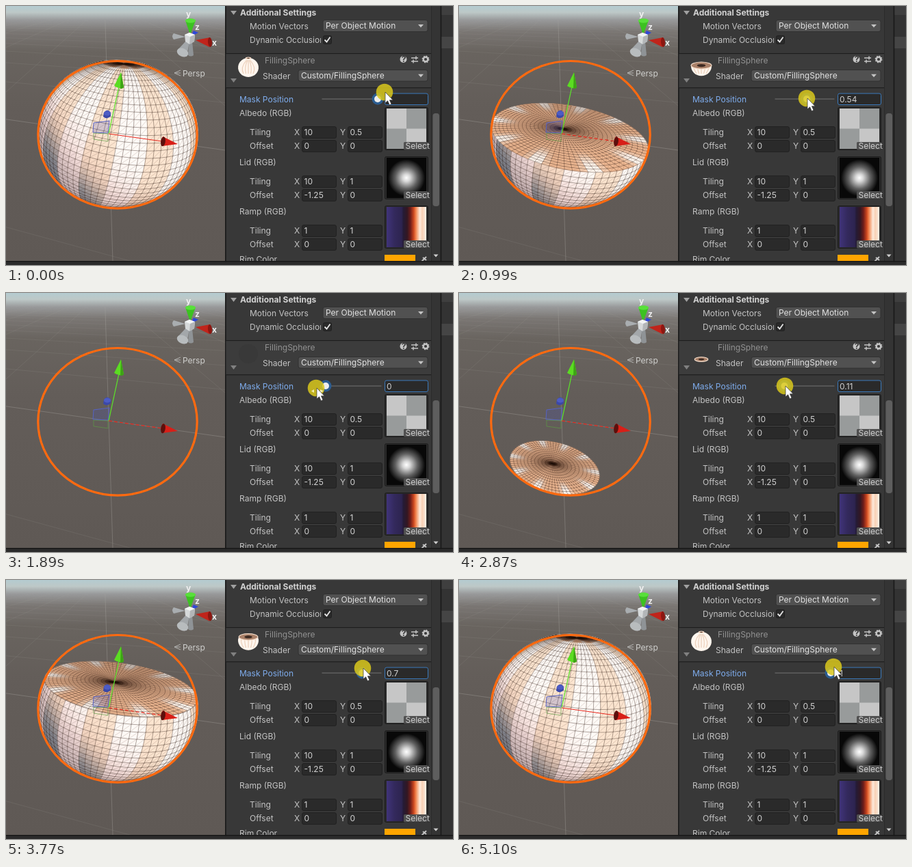
These frames come from a looping animation (653x379 px, 5.2 s). An HTML page with a canvas:

```html
<!DOCTYPE html>
<html lang="en">
<head>
<meta charset="utf-8">
<title>Filling sphere</title>
<style>
html, body { margin: 0; width: 653px; height: 379px; overflow: hidden; background: #282828; }
canvas, svg { position: absolute; left: 0; top: 0; display: block; }
text { font-family: Inter, "Liberation Sans", Arial, sans-serif; font-size: 12px; white-space: pre; }
</style>
</head>
<body>
<canvas id="scene" width="320" height="373"></canvas>
<svg id="ui" width="653" height="379" viewBox="0 0 653 379">
  <defs>
    <radialGradient id="glow">
      <stop offset="0" stop-color="#fff"/><stop offset=".2" stop-color="#d8d8d8"/>
      <stop offset=".6" stop-color="#606060"/><stop offset="1" stop-color="#080808"/>
    </radialGradient>
    <linearGradient id="ramp">
      <stop offset="0" stop-color="#40347a"/><stop offset=".2" stop-color="#33295c"/>
      <stop offset=".38" stop-color="#2d2450"/><stop offset=".42" stop-color="#251b36"/>
      <stop offset=".52" stop-color="#331722"/><stop offset=".6" stop-color="#6e1d1a"/>
      <stop offset=".68" stop-color="#c8451f"/><stop offset=".73" stop-color="#ef7b46"/>
      <stop offset=".78" stop-color="#f6b08a"/><stop offset=".84" stop-color="#fdeadb"/>
      <stop offset=".9" stop-color="#f8d0b4"/><stop offset="1" stop-color="#fdf2e8"/>
    </linearGradient>
    <clipPath id="occl"><rect x="350" y="40" width="110" height="20"/></clipPath>
    <clipPath id="panelClip"><rect width="653" height="373"/></clipPath>
  </defs>
</svg>
<script>
const LOOP = 5200;
// bursts of picture changes: start, spacing, count
const BURSTS = [
  [0, 120, 2], [430, 110, 5], [990, 120, 2], [1220, 105, 3], [1550, 110, 2], [1775, 115, 2],
  [2210, 110, 5], [2770, 100, 2], [2990, 120, 3], [3330, 0, 1], [3550, 110, 3], [3870, 120, 2],
  [4110, 100, 2], [4540, 110, 5], [5100, 0, 1]
];
const TIMES = BURSTS.flatMap(([start, gap, n]) => Array.from({ length: n }, (_, i) => start + i * gap));
// time, mask value, pointer x, pointer y
const DRAG = [
  [0, 1, 553, 126], [120, 1, 557, 127], [430, .99, 546, 131], [540, .93, 538, 133], [870, .62, 514, 135],
  [990, .54, 508, 135], [1430, .16, 479, 137], [1660, .03, 467, 138], [1775, 0, 459, 139], [1890, 0, 453, 139],
  [2320, 0, 463, 138], [2650, .05, 471, 137], [2870, .11, 476, 136], [3110, .33, 491, 132], [3330, .53, 506, 130],
  [3770, .7, 521, 129], [3990, .81, 530, 128], [4210, .9, 537, 128], [4540, .92, 538, 128], [4980, 1, 546, 128],
  [5100, 1, 547, 127]
];

const svg = document.getElementById('ui');
const ctx = document.getElementById('scene').getContext('2d');

function el(tag, attrs, parent = svg) {
  const node = document.createElementNS('http://www.w3.org/2000/svg', tag);
  for (const key in attrs) node.setAttribute(key, attrs[key]);
  return parent.appendChild(node);
}
const rect = (x, y, width, height, fill, more = {}, parent) => el('rect', { x, y, width, height, fill, ...more }, parent);
const path = (d, fill, more = {}, parent) => el('path', { d, fill, ...more }, parent);
const circle = (cx, cy, r, fill, more = {}, parent) => el('circle', { cx, cy, r, fill, ...more }, parent);
const oval = (cx, cy, rx, ry, fill, turn = 0) =>
  el('ellipse', { cx, cy, rx, ry, fill, transform: `rotate(${turn} ${cx} ${cy})` });
function label(x, mid, str, fill = '#c4c4c4', more = {}, parent) {
  const node = el('text', { x, y: mid + 4.3, fill, ...more }, parent);
  node.textContent = str;
  return node;
}

/* ---- camera and sphere ---- */
const FOCAL = 357, EYE = [8, 187], CENTER = [1.372, 0, 3.447];
const PITCH = 28 * Math.PI / 180, YAW = 18.6 * Math.PI / 180;
const sp = Math.sin(PITCH), cp = Math.cos(PITCH), sy = Math.sin(YAW), cy = Math.cos(YAW);
const AX = [cy, sy * sp, -sy * cp], AZ = [sy, -cy * sp, cy * cp], UP = [0, -cp, -sp];
const dirOf = (a, h, b) => AX.map((x, i) => a * x + h * UP[i] + b * AZ[i]);
const toCamera = d => d.map((v, i) => v + CENTER[i]);
const project = p => [EYE[0] + FOCAL * p[0] / p[2], EYE[1] + FOCAL * p[1] / p[2]];
const place = (a, h, b) => project(toCamera(dirOf(a, h, b)));

const clamp = x => Math.min(1, Math.max(0, x));
const smooth = (a, b, x) => { const t = clamp((x - a) / (b - a)); return t * t * (3 - 2 * t); };
const mix = (a, b, t) => a.map((v, i) => v + (b[i] - v) * t);
const rgb = c => `rgb(${c.map(Math.round)})`;
const dot = (a, b) => a[0] * b[0] + a[1] * b[1] + a[2] * b[2];

const SEGS = 80, ROWS = 40, TURN = 2 * Math.PI, LIGHT = [.54, -.6, -.59];
const cutOf = v => 1.94 * v - .97;

function bodyColor(n, lon) {
  const even = Math.floor(lon / (Math.PI / 10)) % 2 === 0;
  const d = dot(n, LIGHT);
  const lit = even ? [252, 229, 208] : [255, 250, 246];
  const soft = even ? [240, 205, 184] : [246, 221, 216];
  const c = mix(soft, lit, smooth(-.25, .35, d));
  const dark = smooth(.05, -.5, d) * clamp(.25 - n[0] * 1.3);
  return rgb(mix(c, even ? [112, 118, 130] : [196, 176, 178], dark * .9));
}

function trace(pts) {
  ctx.moveTo(...pts[0]);
  for (let i = 1; i < pts.length; i++) ctx.lineTo(...pts[i]);
}

function fillQuad(q, color) {
  ctx.beginPath();
  trace(q);
  ctx.closePath();
  ctx.fillStyle = ctx.strokeStyle = color;
  ctx.lineWidth = .7;
  ctx.fill();
  ctx.stroke();
}

function strokeWires(quads, alpha) {
  const pass = (a, draw) => {
    ctx.beginPath();
    quads.forEach(draw);
    ctx.lineWidth = .65;
    ctx.strokeStyle = `rgba(35,18,10,${a})`;
    ctx.stroke();
  };
  pass(alpha, q => trace([q[3], q[0], q[1]]));
  pass(alpha * .4, q => trace([q[0], q[2]]));
}

function drawBody(cut) {
  const quads = [], top = Math.asin(cut);
  const at = (lat, lon) => [Math.cos(lat) * Math.cos(lon), Math.sin(lat), Math.cos(lat) * Math.sin(lon)];
  for (let j = 0; j < ROWS; j++) {
    const lo = -Math.PI / 2 + j * Math.PI / ROWS;
    if (lo >= top) break;
    const hi = Math.min(top, lo + Math.PI / ROWS);
    for (let i = 0; i < SEGS; i++) {
      const l0 = i / SEGS * TURN, l1 = (i + 1) / SEGS * TURN, mid = (l0 + l1) / 2;
      const n = dirOf(...at((lo + hi) / 2, mid));
      if (dot(n, toCamera(n)) > 0) continue;
      const q = [[lo, l0], [lo, l1], [hi, l1], [hi, l0]].map(p => place(...at(...p)));
      fillQuad(q, bodyColor(n, mid));
      quads.push(q);
    }
  }
  strokeWires(quads, .55);
}

function drawLid(cut) {
  const radius = Math.sqrt(1 - cut * cut), rings = Math.max(4, Math.round(18 * radius)), quads = [];
  const at = (r, a) => place(r * radius * Math.cos(a), cut, r * radius * Math.sin(a));
  for (let j = 0; j < rings; j++) {
    for (let i = 0; i < SEGS; i++) {
      const r0 = j / rings, r1 = (j + 1) / rings, a0 = i / SEGS * TURN, a1 = (i + 1) / SEGS * TURN;
      const white = smooth(.6, .95, r1) * smooth(.1, .9, Math.cos(5 * (a0 + a1)));
      const q = [at(r1, a0), at(r1, a1), at(r0, a1), at(r0, a0)];
      fillQuad(q, rgb(mix([238, 184, 146], [255, 246, 238], white)));
      quads.push(q);
    }
  }
  strokeWires(quads, .5);
}

function drawGround() {
  const g = ctx.createLinearGradient(0, 0, 0, 373);
  [[0, '#b4cbd0'], [.025, '#bdc8c7'], [.055, '#98999a'], [.1, '#7a7673'], [.18, '#69645f'], [.4, '#635d59'], [1, '#5f5955']]
    .forEach(s => g.addColorStop(...s));
  ctx.fillStyle = g;
  ctx.fillRect(0, 0, 320, 373);
  const line = (p, q, alpha) => {
    let a = toCamera(dirOf(...p)), b = toCamera(dirOf(...q));
    if (a[2] < .2 && b[2] < .2) return;
    if (b[2] < a[2]) [a, b] = [b, a];
    if (a[2] < .2) a = mix(a, b, (.2 - a[2]) / (b[2] - a[2]));
    ctx.beginPath();
    trace([project(a), project(b)]);
    ctx.strokeStyle = `rgba(165,162,158,${alpha})`;
    ctx.lineWidth = 1;
    ctx.stroke();
  };
  for (let i = -14; i <= 14; i++) {
    const alpha = i === 0 ? .38 : .16 * (1 - Math.abs(i) / 18);
    line([i * 2, 0, -8], [i * 2, 0, 30], alpha);
    line([-30, 0, i * 2], [30, 0, i * 2], alpha);
  }
}

function drawScene(v) {
  drawGround();
  if (v > 0) {
    drawBody(cutOf(v));
    drawLid(cutOf(v));
  }
  ctx.beginPath();
  ctx.ellipse(163, 188.3, 116.2, 107.8, 0, 0, TURN);
  ctx.strokeStyle = '#ff6a10';
  ctx.lineWidth = 3.2;
  ctx.stroke();
}

/* ---- handles in the scene ---- */
function sceneHandles() {
  path('M128 171 L151 168 L149 186 L127 185 Z', 'rgba(70,80,190,.22)', { stroke: '#5663c4' });
  path('M128 186 L149 187 V198 L128 195 Z', 'none', { stroke: '#5d9a45', opacity: .7 });
  path('M150 187 L165 118', 'none', { stroke: '#5ce02c', 'stroke-width': 1.2 });
  const red = path('M150 187 L228 198', 'none', { stroke: '#e8281e', 'stroke-width': 1.2 });
  path('M168 97 L158 117 Q165 122 172 119 Z', '#5bdc22');
  path('M168 97 L167 121 Q171 121 172 119 Z', '#3da315');
  path('M251 202 L229 191 Q225 198 228 205 Z', '#d81f18');
  oval(229.5, 198.3, 3.3, 7, '#5c0f0c', 8);
  path('M143 156 Q148 149 153 156 V161 Q148 167 142 162 Z', '#3b48a8');
  oval(148, 157, 5, 3.6, '#4d5cc4');
  return red;
}

function axisGizmo() {
  path('M262 45 L245 40 Q241 44 245 49 Z', '#a9adb0');
  path('M264 50 L250 65 Q254 74 264 74 L268 52 Z', '#a3a7aa');
  oval(258, 68, 8.5, 6, '#b8bcbe', 22);
  path('M267 52 L266 72 Q270 75 274 72 L272 52 Z', '#8f9396');
  path('M270 45 L274 36 L281 39 Z', '#2f48d8');
  path('M269 42 L262 21 H277 Z', '#3cc221');
  oval(269.5, 21.5, 7.6, 3.2, '#58e03a');
  path('M261 42 L268 39 L276 42 L275 52 L268 56 L262 52 Z', '#d6d9da');
  path('M261 42 L268 39 L276 42 L269 45 Z', '#f2f4f4');
  path('M269 45 L276 42 L275 52 L268 56 Z', '#b3b6b8');
  path('M277 50 L298 46 Q302 53 297 60 Z', '#c0241b');
  oval(298, 53, 3, 7, '#8c1711', -5);
  const bold = { 'font-weight': 700, 'font-size': 13 };
  label(263, 12, 'y', '#f0f0f0', bold);
  label(276, 31, 'z', '#f0f0f0', bold);
  label(301, 54, 'x', '#f0f0f0', bold);
  path('M255 94 L246 98 L255 102 M246 98 H255', 'none', { stroke: '#b4b4b2' });
  label(258, 99, 'Persp', '#cfcfcd');
}

/* ---- inspector ---- */
const arrowDown = (x, y, fill, w = 4.5, h = 6) => path(`M${x - w} ${y} H${x + w} L${x} ${y + h} Z`, fill);
function dropdown(x, y, w, h, str) {
  rect(x, y, w, h, '#515151', { rx: 3, stroke: '#303030' });
  label(x + 4, y + h / 2 - .3, str, '#e2e2e2');
  arrowDown(x + w - 10, y + h / 2 - 2, '#c4c4c4', 4, 4.5);
}
function field(x, mid, name, str) {
  label(x - 11, mid, name);
  rect(x + .5, mid - 8.5, 50, 17, '#2a2a2a', { rx: 2.5, stroke: '#212121' });
  label(x + 3.5, mid, str, '#d2d2d2');
}
function textureRow(y, name, tiling, offset, paint) {
  label(341, y, name);
  [['Tiling', tiling, 28], ['Offset', offset, 48]].forEach(([title, pair, dy]) => {
    label(356, y + dy, title);
    field(432, y + dy, 'X', pair[0]);
    field(499, y + dy, 'Y', pair[1]);
  });
  rect(553.5, y - 8.5, 63, 62, '#2a2a2a', { rx: 2, stroke: '#1c1c1c' });
  paint(556, y - 7, 58, 59);
  rect(581, y + 42, 35, 11.5, '#505050', { rx: 1.5 });
  label(583.5, y + 47.5, 'Select', '#d0d0d0', { 'font-size': 11 });
}

function frame() {
  rect(320, 0, 333, 379, '#282828');
  rect(321.5, 0, 313, 373, '#383838');
  rect(320, 0, 1.5, 379, '#191919');
  rect(622, 0, 12.5, 373, '#343434');
  rect(621, 0, 1, 373, '#2a2a2a');
  rect(623.5, 157, 9.5, 136, '#5e5e5e', { rx: 4 });
  rect(634.5, 0, 2, 379, '#1c1c1c');
  rect(636.5, 0, 17, 373, '#333');
  rect(636.5, 0, 17, 13, '#3f3f3f');
  rect(636.5, 45, 17, 17, '#454545');
  rect(0, 373, 653, 1.5, '#161616');
  rect(0, 374.5, 653, 5, '#2b2b2b');
  arrowDown(628, 363.5, '#d0d0d0', 3.5, 4);
}

function header() {
  arrowDown(332.5, 7, '#a0a0a0');
  label(342, 9.5, 'Additional Settings', '#d2d2d2', { 'font-weight': 700 });
  label(356, 29.5, 'Motion Vectors');
  dropdown(463, 20.5, 153, 17, 'Per Object Motion');
  label(356, 49.5, 'Dynamic Occlusion', '#c4c4c4', {}, el('g', { 'clip-path': 'url(#occl)' }));
  rect(463.5, 43.5, 12, 12, '#2a2a2a', { rx: 2, stroke: '#202020' });
  path('M465.5 49.5 l3 3 l5 -7', 'none', { stroke: '#e4e4e4', 'stroke-width': 1.8 });

  rect(321.5, 69, 299.5, 1.3, '#1d1d1d');
  rect(321.5, 70.3, 299.5, 49, '#3c3c3c');
  rect(321.5, 119, 299.5, 1.3, '#202020');
  label(378, 80, 'FillingSphere', '#929292', { 'font-size': 13 });
  label(375, 103, 'Shader');
  dropdown(427, 93.5, 189, 16.5, 'Custom/FillingSphere');
  arrowDown(332.5, 106, '#808080');
  const icon = { stroke: '#c4c4c4', 'stroke-width': 1.5 };
  circle(580.5, 78, 5, '#c4c4c4');
  label(577.7, 77.2, '?', '#383838', { 'font-size': 9.5, 'font-weight': 700 });
  path('M592 76 h10 m-10 5 h10 M599 73.5 v5 m-4 0 v5', 'none', icon);
  circle(613, 78, 3.3, 'none', { ...icon, 'stroke-width': 2.4 });
  circle(613, 78, 4.7, 'none', { ...icon, 'stroke-dasharray': '1.85 1.84' });
}

function properties() {
  label(341, 137, 'Mask Position', '#7fadee');
  rect(461.5, 135.3, 87, 1.6, '#5e5e5e');
  rect(553.5, 128, 63, 16.5, '#2a2a2a', { rx: 2.5, stroke: '#3a79bb' });

  textureRow(157, 'Albedo (RGB)', ['10', '0.5'], ['0', '0'], (x, y, w, h) => {
    rect(x, y, w, h, '#989b9b');
    rect(x, y, w / 2, h / 2, '#c6c6c6');
    rect(x + w / 2, y + h / 2, w / 2, h / 2, '#c6c6c6');
  });
  textureRow(229, 'Lid (RGB)', ['10', '1'], ['-1.25', '0'], (x, y, w, h) => {
    rect(x, y, w, h, '#080808');
    circle(x + w / 2, y + h / 2, 27, 'url(#glow)');
  });
  textureRow(301, 'Ramp (RGB)', ['1', '1'], ['0', '0'], (x, y, w, h) => rect(x, y, w, h, 'url(#ramp)'));

  const last = el('g', { 'clip-path': 'url(#panelClip)' });
  label(341, 371, 'Rim Color', '#c4c4c4', {}, last);
  rect(553, 364, 45, 12, '#ffa500', {}, last);
  path('M605 376 l6 -6 m-2 -2 l5 4 m-3 -2 l3 -3', 'none', { stroke: '#c4c4c4', 'stroke-width': 2 }, last);
}

const redAxis = sceneHandles();
axisGizmo();
frame();
header();
properties();

/* ---- moving parts of the panel ---- */
const thumb = el('g', {});
const bowl = path('', '#fff6ee', {}, thumb);
const ribs = path('', 'none', { stroke: '#ecd2bd', 'stroke-width': 1.3 }, thumb);
const bowlLid = el('ellipse', { cx: 354, stroke: '#f6dfcd', 'stroke-width': 1.2, fill: '#a98068' }, thumb);
const bowlHole = el('ellipse', { cx: 354, fill: '#3d2a22' }, thumb);
const ghost = circle(354, 89, 14, '#393939');
const value = label(556, 137, '', '#d2d2d2');
const knob = el('g', {});
circle(0, 136, 8.5, '#2c5d91', {}, knob);
circle(0, 136, 5, '#eee', {}, knob);
const pointer = el('g', {});
circle(0, 0, 12.3, '#d9c81c', { opacity: .85 }, pointer);
const slide = path('M-3 2 l-4 2.5 l4 2.5 Z M6 2 l5 2.5 l-5 2.5 Z', '#f4eeb0', {}, pointer);
path('M1 0 v16 l3.6 -3.3 l2.6 6 l2.8 -1.3 l-2.6 -5.7 h4.8 Z', '#fff', { stroke: '#333', 'stroke-width': .7 }, pointer);

const setShown = (node, on) => node.setAttribute('visibility', on ? 'visible' : 'hidden');

function drawThumb(v) {
  const cut = cutOf(v), half = 15 * Math.sqrt(1 - cut * cut), y = 88 - 12 * cut;
  setShown(thumb, v > 0);
  setShown(ghost, v === 0);
  bowl.setAttribute('d', `M${354 - half} ${y} A15 14 0 ${cut > 0 ? 1 : 0} 0 ${354 + half} ${y} Z`);
  let d = '';
  for (let i = -2; i <= 2 && cut > -.3; i++) {
    d += `M${354 + i * half * .36} ${y + 3} Q${354 + i * 6} 90 ${354 + i * 3.5} 99`;
  }
  ribs.setAttribute('d', d);
  [[bowlLid, 1], [bowlHole, .42]].forEach(([node, k]) => {
    node.setAttribute('cy', y);
    node.setAttribute('rx', half * k);
    node.setAttribute('ry', half * .34 * k);
  });
}

function dragAt(t) {
  let i = DRAG.length - 1;
  while (DRAG[i][0] > t) i--;
  const a = DRAG[i], b = DRAG[i + 1] || a;
  const [, v, x, y] = mix(a, b, a === b ? 0 : (t - a[0]) / (b[0] - a[0]));
  return [Math.round(v * 100) / 100, Math.round(x), Math.round(y)];
}

let shownTime = -1, shownValue = -1;
function show(time) {
  const [v, x, y] = dragAt(time);
  if (v !== shownValue) {
    drawScene(v);
    drawThumb(v);
    value.textContent = String(v);
    knob.setAttribute('transform', `translate(${467 + 76 * v})`);
    redAxis.setAttribute('stroke-dasharray', v > .9 ? 'none' : '5 3');
    shownValue = v;
  }
  pointer.setAttribute('transform', `translate(${x} ${y})`);
  setShown(slide, x < 460);
  shownTime = time;
}

function tick() {
  const now = performance.now() % LOOP;
  const time = TIMES.filter(t => t <= now).pop();
  if (time !== shownTime) show(time);
  requestAnimationFrame(tick);
}
tick();
</script>
</body>
</html>
```
